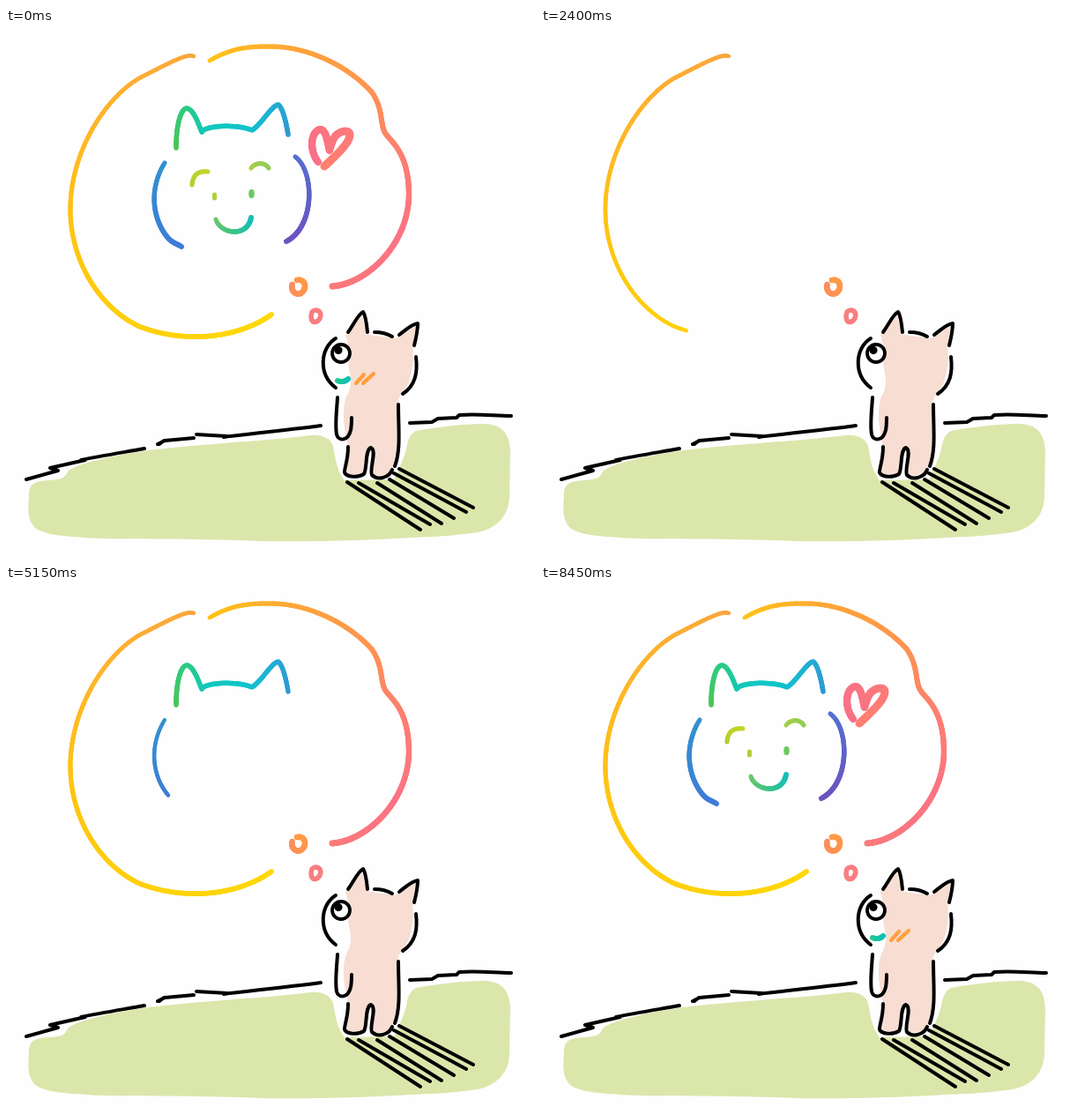
Animation of 600 by 600 pixels, one loop 8.9 s. Source, as an HTML page with a canvas:

```html
<!DOCTYPE html>
<html lang="en">
<head>
<meta charset="utf-8">
<title>Daydream</title>
<style>
  html, body { margin: 0; width: 100%; height: 100%; overflow: hidden; background: #fefefe; }
  svg, canvas { position: absolute; left: 0; top: 0; width: 600px; height: 600px; }
  .ink { fill: none; stroke: #000; stroke-width: 4; stroke-linecap: round; stroke-linejoin: round; }
</style>
</head>
<body>
<svg viewBox="0 0 600 600">
  <path fill="#dbe6ab" d="M26 533C25 517 32 514 48 513C62 512 67 511 70 503C80 493 135 482 170 478C230 471 300 468 345 462
    C360 461 368 466 371 474C373 484 375 503 384 513L440 512C447 498 451 488 454 478C456 466 458 461 465 457
    C490 452 520 449 545 449C566 451 571 463 572 480L571 530C571 552 558 567 535 572C500 577 480 577 460 578
    C400 582 320 583 290 582C200 578 130 581 90 578C55 576 40 573 32 566C24 556 25 545 26 533Z"/>
  <path fill="#f8ddd2" d="M385 348L391 341L404 326L409 347C420 350 432 350 442 352L465 338L461 360C463 375 461 392 456 404
    C450 414 443 420 443 432L443 480L437 506L418 508L415 480L410 481L404 506L387 506L388 474C386 467 384 455 383 443
    C383 432 383 428 386 418C391 411 392 402 390 391C386 380 391 365 385 348Z"/>
  <g class="ink">
    <path d="M23 512L59 502L50 499L90 490L85 490C110 485 135 481 157 477M172 472L180 468L213 465M179 468L174 472
      M216 461L251 463L247 464C285 459 320 456 357 451M458 448L483 447L490 443L511 442L514 439C535 437 555 440 573 440"/>
    <path d="M387 515L470 569M400 516L481 563M421 516L494 562M435 512L508 556M440 505L522 549M446 500L530 544"/>
    <path d="M388 345C394 337 399 325 405 322C408 326 409 335 410 345M418 345C426 345 433 347 438 350
      M446 348C454 342 460 336 467 335C467 343 465 352 463 360"/>
    <path d="M374 352C356 363 354 393 374 408M465 373C467 390 465 405 450 415"/>
    <path d="M376 419C375 435 373 450 375 461C377 469 388 469 391 456C392 451 392 446 392 442M445 427C445 455 448 478 441 497"/>
    <path d="M388 475C388 490 384 498 384 504C386 510 400 510 406 506C410 499 407 478 414 476C421 479 412 500 415 507
      C421 513 434 511 438 501"/>
    <circle cx="380" cy="369" r="10" fill="#fefefe" stroke-width="3.8"/>
    <circle cx="377" cy="365.5" r="2.6" fill="#000"/>
  </g>
</svg>
<canvas id="dream" width="600" height="600"></canvas>
<script>
const LOOP = 8900, STEP = 50, CLEAR_AT = 50;
const SWELL = 700;   // time a fresh line takes to reach full weight
const THIN = 0.78;   // weight of a fresh line

const ctx = document.getElementById('dream').getContext('2d');
ctx.lineCap = 'round';

const rgb = hex => [1, 3, 5].map(i => parseInt(hex.slice(i, i + 2), 16));
const mix = (a, b, k) => a + (b - a) * k;

function colourAt(stops, k) {
  const x = k * (stops.length - 1);
  const i = Math.min(Math.floor(x), stops.length - 2);
  if (i < 0) return stops[0];
  const a = rgb(stops[i]), b = rgb(stops[i + 1]);
  return `rgb(${a.map((v, c) => Math.round(mix(v, b[c], x - i)))})`;
}

// Cuts a path into short pieces, each with its own moment, colour and weight.
function stroke(start, end, w0, w1, stops, d) {
  const path = document.createElementNS('http://www.w3.org/2000/svg', 'path');
  path.setAttribute('d', d);
  const length = path.getTotalLength(), n = Math.ceil(length / 2);
  return Array.from({ length: n }, (_, i) => ({
    from: path.getPointAtLength(length * i / n),
    to: path.getPointAtLength(length * (i + 1) / n),
    time: mix(start, end, (i + 1) / n),
    weight: mix(w0, w1, i / n),
    colour: colourAt(stops, i / n)
  }));
}

const pieces = [
  // thought dots
  stroke(370, 670, 5.3, 5.3, ['#f97e80'], 'M347 322C345 330 347 334 351 333.5C358 332 360 318 349 320.5'),
  stroke(850, 1150, 6.5, 6.5, ['#fc8d5c', '#ff9a45'], 'M324.5 291C323 299 329 303 334 301C341 298 341.5 284 330 286'),
  // bubble
  stroke(1500, 2700, 4.6, 5.8, ['#fba63e', '#ffb52a', '#ffc512', '#ffd10a', '#ffd80a'],
    'M213 32C205 29 190 37 151 57C112 80 74 140 73 203C72 260 103 315 150 338C200 358 262 353 301 325'),
  stroke(2700, 3755, 4.8, 7, ['#ffc416', '#ffa638', '#ff954f', '#fc7f70', '#fb7385', '#fb7a7a'],
    'M231 37C258 21 280 21 300 21C345 21 390 45 415 73C428 92 424 108 430 119C436 129 457 140 457 190C456 245 410 290 370 293'),
  // imagined face
  stroke(4010, 4620, 5.5, 5.5, ['#4cc455', '#2fcb80', '#12c8b8', '#10c4cc', '#22aed4', '#2f98d2'],
    'M193 136C193 110 198 92 205 91C212 92 217 105 222 118C226 110 264 109 279 116C290 109 302 87 309 87C314 91 318 108 320 121'),
  stroke(4940, 5190, 5, 6, ['#3292cf', '#3f7bd8'], 'M180 153C162 182 166 215 182 236C188 244 193 244 199 248'),
  stroke(5300, 5550, 5, 6, ['#5470d2', '#6d52be'], 'M328 146C350 162 351 225 318 242'),
  stroke(5650, 5720, 5, 5, ['#b4cf30', '#c4d428'], 'M211 178C212 166 218 162 229 163'),
  stroke(5780, 5850, 5, 5, ['#a8d048', '#90cc58'], 'M278 159C283 152 294 152 298 159'),
  stroke(5900, 5940, 5, 5, ['#b0d038'], 'M236.5 189v4'),
  stroke(6020, 6060, 6, 6, ['#6cc860'], 'M278.5 186v4'),
  stroke(6180, 6360, 5, 6, ['#6cc868', '#3cc488', '#14bdb8'], 'M238 217C243 234 274 238 278 215'),
  // heart
  stroke(6540, 7020, 8, 9, ['#fa7088', '#fb7580', '#ff8070'],
    'M354 152C343 138 346 116 357 115C363 116 365 130 367 139C369 130 372 124 374 122C380 116 390 115 390 121C390 130 376 143 361 157'),
  // smile and blush
  stroke(7200, 7290, 6, 6, ['#20c890', '#10c0b4'], 'M376 400C381 402 385 401 388 398'),
  stroke(7450, 7520, 4.2, 4.2, ['#ffa040'], 'M406 393L397 403'),
  stroke(7660, 7740, 4.2, 4.2, ['#ffa040'], 'M417 392L405 403')
].flat();

function draw(t) {
  ctx.clearRect(0, 0, 600, 600);
  for (const p of pieces) {
    if (p.time > t) continue;
    ctx.lineWidth = p.weight * mix(THIN, 1, Math.min((t - p.time) / SWELL, 1));
    ctx.strokeStyle = p.colour;
    ctx.beginPath();
    ctx.moveTo(p.from.x, p.from.y);
    ctx.lineTo(p.to.x, p.to.y);
    ctx.stroke();
  }
}

const begin = performance.now();
function tick() {
  const elapsed = (performance.now() - begin) % LOOP;
  const t = Math.floor(elapsed / STEP) * STEP;
  draw(t < CLEAR_AT ? LOOP : t < 400 ? 0 : t);
  requestAnimationFrame(tick);
}
tick();
</script>
</body>
</html>
```
